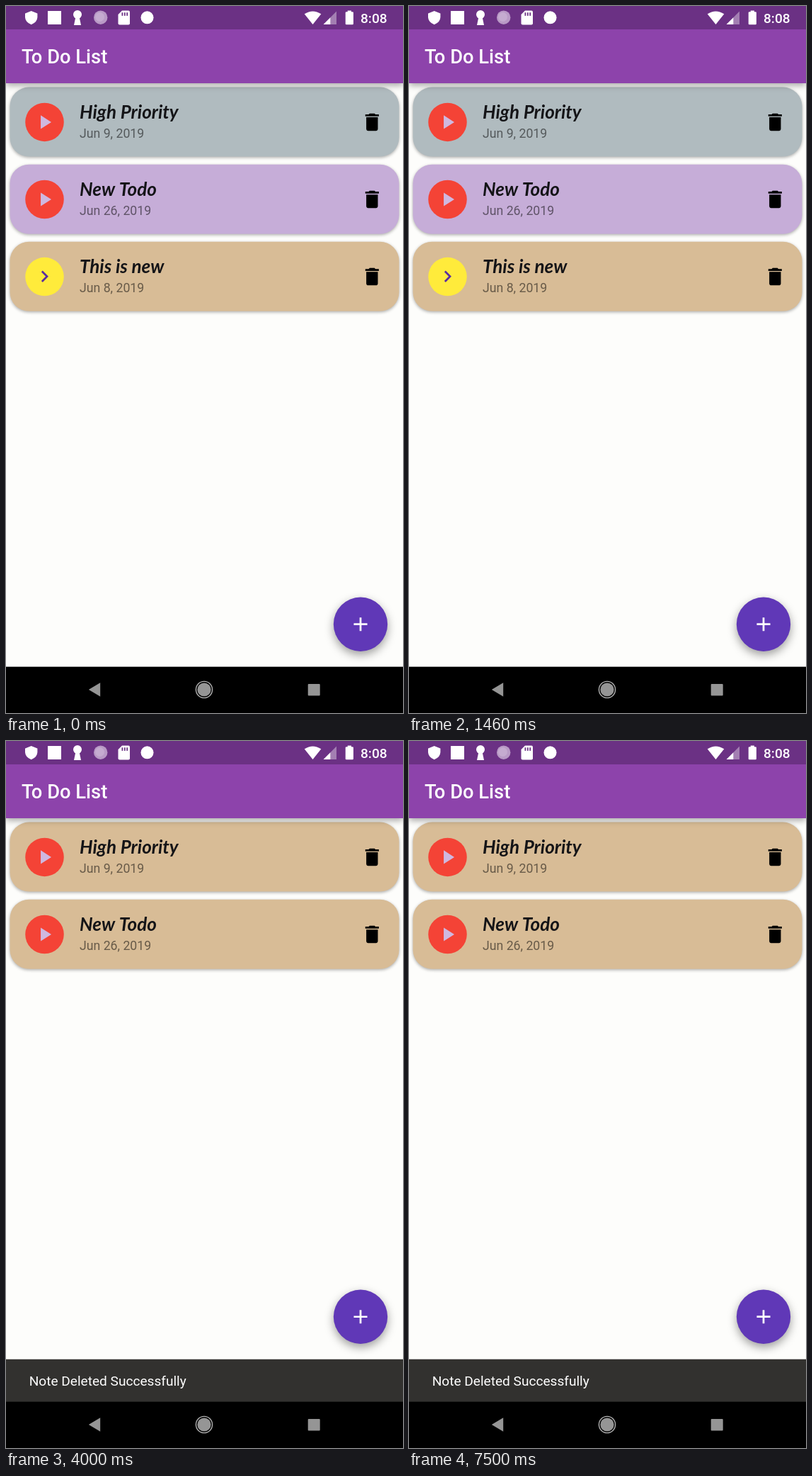
An HTML page with a canvas for the animation above (7.54 s loop, 561 by 998 pixels).

```html
<!DOCTYPE html>
<html lang="en">
<head>
<meta charset="utf-8">
<title>To Do List</title>
<style>
  html, body { margin: 0; width: 100%; height: 100%; overflow: hidden; background: #fdfdfb; }
  canvas { display: block; width: 561px; height: 998px; }
</style>
</head>
<body>
<canvas id="stage"></canvas>
<script>
const W = 561, H = 998, LOOP = 7540;
const DP = W / 411.43;            // pixels per density-independent unit
const DELETE_AT = 3760, SLIDE = 250;
const NAV_TOP = 932.7, BAR_H = 60;

const canvas = document.getElementById('stage');
const ctx = canvas.getContext('2d');
const ratio = window.devicePixelRatio || 1;
canvas.width = W * ratio;
canvas.height = H * ratio;

const GREY = '#b0bbbf', LILAC = '#c6add8', TAN = '#d8bc96';
const RED = '#f44336', YELLOW = '#ffeb3b';

const icons = {
  play: new Path2D('M8 5v14l11-7z'),
  next: new Path2D('M8.59 16.34l4.58-4.59-4.58-4.59L10 5.75l6 6-6 6z'),
  trash: new Path2D('M6 19c0 1.1.9 2 2 2h8c1.1 0 2-.9 2-2V7H6zM19 4h-3.5l-1-1h-5l-1 1H5v2h14z'),
  plus: new Path2D('M19 13h-6v6h-2v-6H5v-2h6V5h2v6h6z')
};

const notes = [
  { title: 'High Priority', date: 'Jun 9, 2019', dot: RED, icon: 'play', tint: '#cfb8e0' },
  { title: 'New Todo', date: 'Jun 26, 2019', dot: RED, icon: 'play', tint: '#cfb8e0' },
  { title: 'This is new', date: 'Jun 8, 2019', dot: YELLOW, icon: 'next', tint: '#5a2ca0' }
];

function rect(x, y, w, h, color) {
  ctx.fillStyle = color;
  ctx.fillRect(x, y, w, h);
}

function round(x, y, w, h, r, color) {
  ctx.fillStyle = color;
  ctx.beginPath();
  ctx.roundRect(x, y, w, h, r);
  ctx.fill();
}

function disc(x, y, r, color) {
  ctx.fillStyle = color;
  ctx.beginPath();
  ctx.arc(x, y, r, 0, Math.PI * 2);
  ctx.fill();
}

function shape(d, color) {
  ctx.fillStyle = color;
  ctx.fill(new Path2D(d));
}

function text(str, x, y, font, color) {
  ctx.font = font;
  ctx.fillStyle = color;
  ctx.fillText(str, x, y);
}

function icon(name, cx, cy, color) {
  ctx.save();
  ctx.translate(cx - 12 * DP, cy - 12 * DP);
  ctx.scale(DP, DP);
  ctx.fillStyle = color;
  ctx.fill(icons[name]);
  ctx.restore();
}

function withShadow(alpha, blur, dy, draw) {
  ctx.save();
  ctx.shadowColor = `rgba(0,0,0,${alpha})`;
  ctx.shadowBlur = blur * ratio;
  ctx.shadowOffsetY = dy * ratio;
  draw();
  ctx.restore();
}

// cubic-bezier(.4, 0, .2, 1)
function ease(x) {
  if (x <= 0) return 0;
  if (x >= 1) return 1;
  let lo = 0, hi = 1;
  for (let i = 0; i < 24; i++) {
    const u = (lo + hi) / 2, v = 1 - u;
    if (1.2 * v * v * u + 0.6 * v * u * u + u * u * u < x) lo = u; else hi = u;
  }
  return lo * lo * (3 - 2 * lo);
}

function card(note, i, color) {
  const top = 114.6 + i * 109.1, mid = top + 49.3;
  withShadow(0.32, 4, 1.5, () => round(5.5, top, 550, 98, 27, color));
  disc(54.5, mid, 20 * DP, note.dot);
  icon(note.icon, 54.5, mid, note.tint);
  text(note.title, 104, top + 44, 'italic 700 26px Lato, sans-serif', '#141417');
  text(note.date, 104, top + 71.2, '400 17.7px Roboto, sans-serif', 'rgba(0,0,0,.52)');
  icon('trash', 517.3, mid, '#000');
}

function statusBar() {
  const white = '#fff';
  rect(0, 0, W, 33, '#6b3184');
  shape('M35.7 7L44.4 10.5V16Q44 23 35.7 26.2Q27.4 23 27 16V10.5Z', white);
  rect(59, 7, 19, 19, white);
  disc(101, 12, 6, white);
  shape('M98.5 15H103.5L106 27H96Z', white);
  disc(133.7, 16.2, 9.7, '#b99ac6');
  disc(132.5, 15.5, 6.5, '#c5abd0');
  shape('M164 6.5H173Q175 6.5 175 8.5V24.5Q175 26.5 173 26.5H160.5Q158.5 26.5 158.5 24.5V12Z', white);
  for (let i = 0; i < 3; i++) rect(163.5 + i * 3.4, 9.2, 1.8, 4.6, '#6b3184');
  disc(199.5, 16.3, 9, white);
  shape('M433.5 26L421.7 11.3Q433.5 3.5 445.3 11.3Z', white);
  shape('M467 7.5V26H448.6Z', 'rgba(255,255,255,.38)');
  shape('M458.3 16.3V26H448.6Z', white);
  rect(482.7, 6.5, 5.2, 3, white);
  round(479.7, 8.3, 11.2, 18, 1.3, white);
  text('8:08', 501, 23.6, '500 19.1px Roboto, sans-serif', white);
}

function appBar() {
  withShadow(0.36, 9, 3, () => rect(0, 33, W, 76, '#8d43ab'));
  text('To Do List', 22, 81.3, '500 27.3px Roboto, sans-serif', '#fff');
}

function addButton(cy) {
  withShadow(0.38, 13, 5, () => disc(501, cy, 28 * DP, '#6038b7'));
  icon('plus', 501, cy, '#fff');
}

function snackbar(top, alpha) {
  rect(0, top, W, BAR_H + 1, '#32312f');
  ctx.globalAlpha = alpha;
  text('Note Deleted Successfully', 32.7, top + 37, '400 19.1px Roboto, sans-serif', '#fff');
  ctx.globalAlpha = 1;
}

function navBar() {
  const grey = '#959595';
  rect(0, NAV_TOP, W, H - NAV_TOP, '#000');
  shape('M116.8 965L133.2 955.2V974.8Z', grey);
  disc(280, 965, 9.6, grey);
  ctx.strokeStyle = '#b2b2b2';
  ctx.lineWidth = 1.4;
  ctx.beginPath();
  ctx.arc(280, 965, 11.6, 0, Math.PI * 2);
  ctx.stroke();
  round(426.7, 957, 17, 16.6, 1, grey);
}

function draw(t) {
  const deleted = t >= DELETE_AT;
  const p = (t - DELETE_AT) / SLIDE;
  const rise = ease(p) * BAR_H;
  const list = deleted ? notes.slice(0, 2) : notes;
  const colors = deleted ? [TAN, TAN] : [GREY, LILAC, TAN];

  ctx.setTransform(ratio, 0, 0, ratio, 0, 0);
  rect(0, 0, W, H, '#fdfdfb');
  list.forEach((note, i) => card(note, i, colors[i]));
  appBar();
  statusBar();
  addButton(872.7 - rise);
  if (deleted) snackbar(NAV_TOP - rise, ease((p - 0.45) / 0.55));
  navBar();
}

const start = performance.now();
function tick() {
  draw((performance.now() - start) % LOOP);
  requestAnimationFrame(tick);
}
tick();
</script>
</body>
</html>
```
